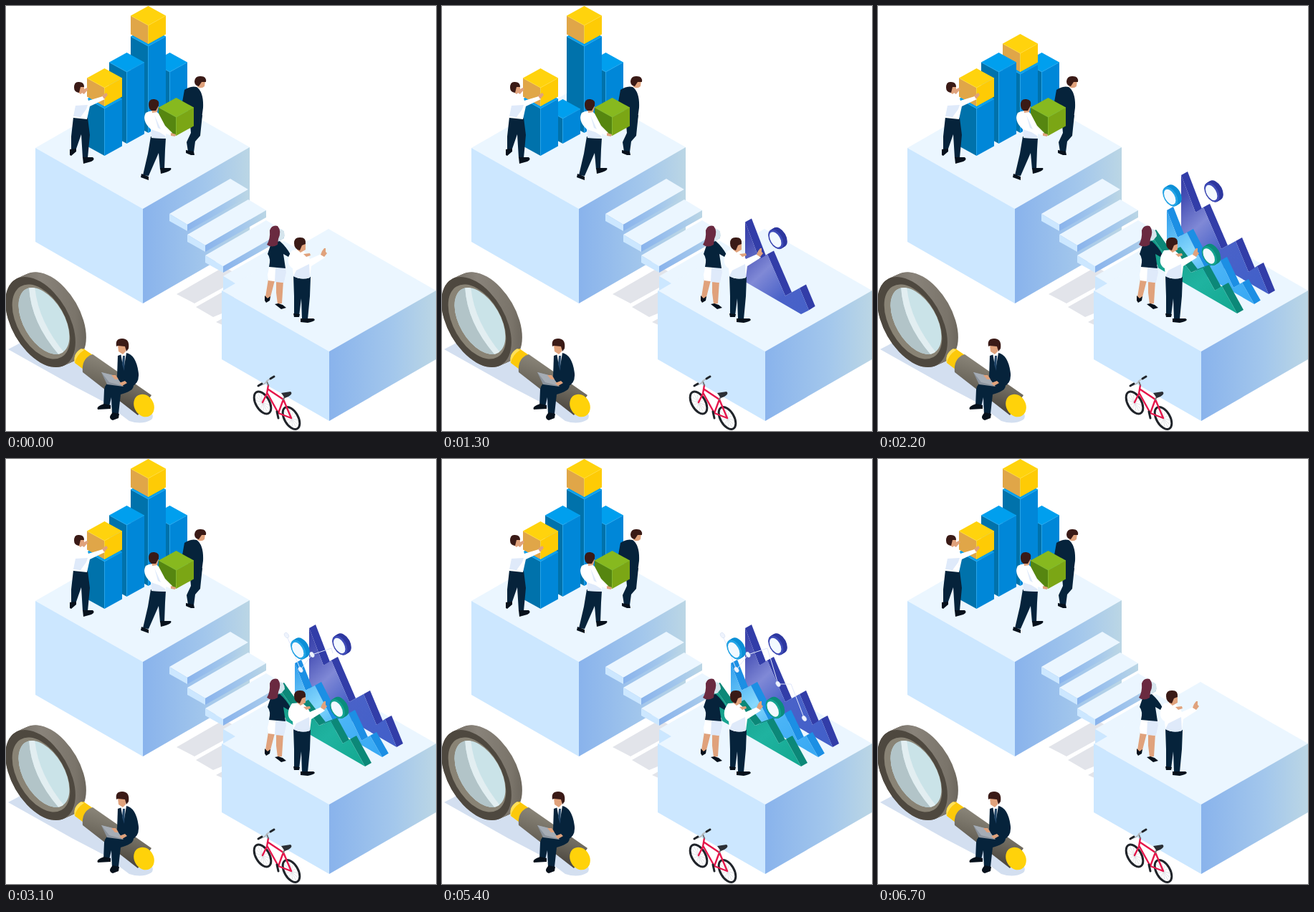
Animation, 600 px wide and 593 px high, one loop 6800 ms. Source, as an HTML page:

```html
<!DOCTYPE html>
<html lang="en">
<head>
<meta charset="utf-8">
<title>Isometric charts</title>
<style>
  html, body { margin: 0; width: 100%; height: 100%; overflow: hidden; background: #fff; }
  svg { display: block; width: 600px; height: 593px; }
  .skin { fill: #e0a27c; }
  .hair { fill: #3a1a16; }
  .navy { fill: #06233b; }
  .shoe { fill: #07111c; }
  .shirt { fill: #fff; }
  .fold { fill: #dfeafa; }
  .top { fill: #ebf6ff; }
  .left { fill: #cce7ff; }
  .right { fill: url(#side); }
  .shade { fill: #d3dff0; }
  .cast { fill: #e2e4ea; }
  .thin { fill: none; stroke-linecap: round; stroke-linejoin: round; }
</style>
</head>
<body>
<svg viewBox="0 0 600 593" xmlns="http://www.w3.org/2000/svg">
  <defs>
    <linearGradient id="side"><stop stop-color="#89b3ec"/><stop offset=".6" stop-color="#a3c7ec"/><stop offset="1" stop-color="#bbd6e5"/></linearGradient>
    <linearGradient id="indigo" x1="0" y1="0" x2=".7" y2="1"><stop stop-color="#343da6"/><stop offset=".14" stop-color="#464fb4"/><stop offset=".38" stop-color="#8089d6"/><stop offset=".62" stop-color="#4a62c8"/><stop offset="1" stop-color="#4360c9"/></linearGradient>
    <linearGradient id="sky" x1="0" y1="0" x2=".8" y2="1"><stop stop-color="#2f9dec"/><stop offset=".4" stop-color="#86d8fd"/><stop offset=".65" stop-color="#4ab4f6"/><stop offset="1" stop-color="#3aaaf4"/></linearGradient>
    <linearGradient id="teal" x1="0" y1="0" x2="1" y2="1"><stop stop-color="#119581"/><stop offset=".6" stop-color="#1fb3a0"/><stop offset="1" stop-color="#13a78f"/></linearGradient>
    <linearGradient id="rim" x1="0" y1="0" x2="1" y2="1"><stop stop-color="#69635a"/><stop offset=".4" stop-color="#89837a"/><stop offset=".75" stop-color="#7a746a"/><stop offset="1" stop-color="#58534a"/></linearGradient>
    <linearGradient id="grip" x1=".6" y1=".2" x2=".4" y2=".8"><stop stop-color="#878276"/><stop offset=".5" stop-color="#6f6a5f"/><stop offset="1" stop-color="#4f4a42"/></linearGradient>
    <clipPath id="floor"><path d="M370 0H600V371L554 398 511 425 501 430 370 354Z"/></clipPath>
    <clipPath id="lens"><ellipse cx="53" cy="439.500" rx="28.500" ry="51" transform="rotate(-30 53 439.500)"/></clipPath>
  </defs>

  <!-- upper block -->
  <path class="top" d="M41 198 191 112 340 197 191 283Z"/>
  <path class="left" d="M41 198 191 283V415L41 329Z"/>
  <path class="right" d="M191 283 340 197V329L191 415Z"/>

  <!-- stairs -->
  <path class="cast" d="M238 402 304 364 330 378 263 415ZM265 420 318 390V422L289 434ZM293 441 318 427V452Z"/>
  <g id="stairs"></g>

  <!-- lower block -->
  <path class="top" d="M301 397 450 311 600 397 451 482Z"/>
  <path class="left" d="M301 397 451 482V579L301 493Z"/>
  <path class="right" d="M451 482 600 397V493L451 579Z"/>
  <path class="top" d="M303 377 388 328 405 338 320 387Z"/>
  <path class="left" d="M303 377 320 387 303 397Z"/>

  <g id="bars"></g>

  <!-- man in a suit -->
  <path class="navy" d="M256 154 274 152 272 171 271 181 264 189 262 204 254 203 252 190 258 177Z"/>
  <path class="shoe" d="M251 201 262 203 263 208 258 208 251 205Z"/>
  <path class="navy" d="M249 117Q258 111 266 113 276 120 275 142L273 157 255 160 253 141 246 134Z"/>
  <path class="skin" d="M268 104 278 104 277 112Q273 116 267 113Z"/>
  <path class="hair" d="M263 105Q264 97 272 98 280 98 279 106L273 106 269 112Q263 111 263 105Z"/>
  <g id="crate"></g>

  <!-- man with a crate -->
  <path class="navy" d="M202 182 223 184 222 200 221 228 215 228 213 205 199 237 191 236 198 206Z"/>
  <path class="shoe" d="M189 234 199 238 199 243 188 239ZM215 226 230 226Q233 230 216 234Z"/>
  <path class="shirt" d="M195 149Q206 143 213 150L222 167 232 177 231 181 223 178 223 185 203 184 202 172Q189 160 195 149Z"/>
  <path class="fold" d="M202 172 214 176 222 181 223 185 203 184ZM207 152 216 172 212 170Z"/>
  <path class="skin" d="M230 177 237 179 236 182 230 181ZM203 141 213 140 211 148 204 149Z"/>
  <path class="hair" d="M199 138Q199 129 207 130 215 131 213 139L209 146 203 146Q199 143 199 138Z"/>

  <!-- man at the first bar -->
  <path class="navy" d="M94 155 114 156 117 180 114 212 107 212 105 179 97 202 91 201 91 182Z"/>
  <path class="shoe" d="M89 200 98 199 98 203 91 209 89 208ZM107 211 121 211Q125 214 119 217L108 220Z"/>
  <path class="skin" d="M103 119 113 114 115 116 108 124Z"/>
  <path class="shirt" d="M95 121 106 121Q114 126 115 132L135 126 138 130 117 140 113 158 94 156 94 143Q85 130 95 121Z"/>
  <path class="fold" d="M97 139 114 138 112 144 104 155 94 154Z"/>
  <path class="skin" d="M134 125 140 121 142 124 137 130ZM102 111 109 111 109 119 104 123 100 120Z"/>
  <path class="hair" d="M95 114Q95 105 102 106 109 106 109 113L104 113 102 121Q95 120 95 114Z"/>

  <g clip-path="url(#floor)" id="charts"></g>

  <!-- woman -->
  <path class="skin" d="M366 381 375 383 369 406 365 412 362 406ZM377 383 387 383 385 415 379 416 377 400Z"/>
  <path class="shoe" d="M361 404 365 408 369 405 368 411 363 414 361 411ZM375 416 380 415 386 417 391 421 384 423Z"/>
  <path class="shirt" d="M368 361 390 361 391 372 388 386 366 383 365 375Z"/>
  <path class="fold" d="M376 365 390 362 391 372 388 386 375 385Z"/>
  <path class="navy" d="M370 331 382 328Q392 337 397 347L394 350 387 346 390 366 367 364Q370 352 365 346Z"/>
  <path d="M378 313Q388 308 389 321L384 327 378 328Z" fill="#d5e5ed"/>
  <path d="M368 313Q371 305 379 307 385 314 380 325L379 333Q371 338 364 333 369 325 368 313Z" fill="#6a2a40"/>

  <!-- pointing man -->
  <path class="navy" d="M401 375 425 378 424 405 421 437 413 437 412 408 409 432 402 431 402 405Z"/>
  <path class="shoe" d="M401 429 410 430 409 434 402 434ZM411 436 429 436Q435 439 421 442L411 441Z"/>
  <path class="shirt" d="M399 341 412 340Q420 344 424 353L440 346 445 351 426 363 424 379Q412 383 401 377L400 366Q391 361 395 348Z"/>
  <path class="fold" d="M405 369 423 360 424 379Q412 383 401 377Z"/>
  <path class="skin" d="M439 347 441 342 444 338 446 338 446 343 448 345 444 350ZM415 346 424 345 425 348 419 350ZM406 332 418 332 418 340 411 344 406 340Z"/>
  <path class="hair" d="M402 331Q402 322 411 323 419 323 418 332L413 334 410 341Q402 339 402 331Z"/>

  <!-- magnifier -->
  <path class="shade" d="M3 479 24 468 74 498 110 494 160 548 196 560Q209 570 203 577 190 585 172 579L136 552 92 529Z"/>
  <g id="glass"></g>
  <path d="M96 498Q93 483 108 478L121 487 108 507Z" fill="#fcc90a"/>
  <path d="M96 498Q98 487 109 480L105 478Q93 485 96 498Z" fill="#ffe05a"/>
  <path d="M107 511Q105 491 121 486L203 543 184 571Z" fill="url(#grip)"/>
  <ellipse cx="192.500" cy="557.500" rx="13.500" ry="16.500" transform="rotate(-30 192.500 557.500)" fill="#ffd20a"/>

  <!-- seated man -->
  <path class="navy" d="M146 524 176 526Q184 535 160 542L157 569 148 571 147 546 144 559 136 559 137 535Q138 527 146 524Z"/>
  <path class="shoe" d="M137 555 146 557 146 562 128 563Q125 559 137 555ZM149 567 158 569 157 575 149 578Q141 575 149 567Z"/>
  <path class="navy" d="M156 488 168 484Q182 487 185 513 186 527 175 531L159 528 155 517Z"/>
  <path class="shirt" d="M160 484 168 484 165 502 162 496Z"/>
  <path d="M163 488 166 488 165 509 162 500Z" fill="#214568"/>
  <path d="M133 511 153 516 164 531 141 528Z" fill="#8b939d"/>
  <path d="M133 511 153 516 163 530 144 525Z" fill="#a5acb5"/>
  <path class="skin" d="M147 515 153 515 157 521 152 521ZM158 526 166 523 169 526 162 530ZM156 473 168 473 167 482 163 486 157 482Z"/>
  <path class="hair" d="M154 475Q152 464 162 464 173 464 171 478L168 482 166 475 156 474Z"/>

  <!-- bicycle -->
  <g class="thin">
    <g id="wheels"></g>
    <path d="M358 553 364 541 366 529M366 535 387 549 380 568 365 541M380 568 398 575 387 549" stroke="#e5164b" stroke-width="2.400"/>
    <path d="M387 549 390 543M366 529 364 524" stroke="#777" stroke-width="2"/>
    <path d="M355 529Q362 528 364 523L371 519" stroke="#b7bcc2" stroke-width="2"/>
    <path d="M352 530 357 527M369 520 374 517" stroke="#20242a" stroke-width="3"/>
    <path d="M378 566 380 575" stroke="#20242a" stroke-width="3"/>
  </g>
  <path d="M384 540 397 538Q401 541 394 545L389 547Z" fill="#2b2f35"/>
</svg>

<script>
const LOOP = 6800, FRAME = 100, RISE = 13.1, SINK = 15.25;
const $ = id => document.getElementById(id);

function add(parent, tag, attrs) {
  const el = document.createElementNS('http://www.w3.org/2000/svg', tag);
  for (const k in attrs) el.setAttribute(k, attrs[k]);
  return parent.appendChild(el);
}
const poly = (parent, points, fill) => add(parent, 'polygon', { points: points.join(' '), fill });
const disc = (parent, x, y, rx, ry, attrs) =>
  add(parent, 'ellipse', { cx: x, cy: y, rx, ry, transform: `rotate(-30 ${x} ${y})`, ...attrs });

// Isometric column: back corner at (x, y), front corner ends at base.
function prism(parent, x, [top, left, right], edge) {
  const g = add(parent, 'g', {});
  const faces = [left, right, top].map(c => poly(g, [], c));
  const line = add(g, 'path', { stroke: edge, 'stroke-width': .8, fill: 'none' });
  const w = 24.5, h = 13.5;
  return (y, base) => {
    const l = [x - w, y + h], r = [x + w, y + h], f = [x, y + 2 * h];
    const sets = [
      [l, f, [x, base], [x - w, base - h]],
      [f, r, [x + w, base - h], [x, base]],
      [[x, y], r, f, l]
    ];
    faces.forEach((p, i) => p.setAttribute('points', sets[i].join(' ')));
    line.setAttribute('d', `M${l} ${f} ${r}M${f}V${base}`);
  };
}

const blue = ['#009fee', '#0072ab', '#0087d8'];
const gold = ['#ffd30d', '#e0a648', '#fecb05'];
const bar = x => prism($('bars'), x, blue, '#22a6ee');
const cube = x => prism($('bars'), x, gold, '#ffda3a');
const rightBar = bar(228.5), tower = bar(198.5), cap = cube(198.5), middle = bar(168.5);
bar(137.5)(116, 209);
cube(137.5)(87, 140);
prism($('crate'), 237.5, ['#87b91f', '#568610', '#7ba615'], '#8fc02a')(128, 181);

for (let i = 0; i < 3; i++) {
  const g = add($('stairs'), 'g', { transform: `translate(${25 * i} ${29 * i})` });
  add(g, 'path', { class: 'top', d: 'M228 290 313 241 338 256 253 305Z' });
  add(g, 'path', { class: 'left', d: 'M228 290 253 305V314L228 300Z' });
  add(g, 'path', { class: 'right', d: 'M253 305 338 256V266L253 314Z' });
}

function magnifier(g) {
  for (let i = 0; i <= 15; i++) disc(g, 48 + i, 441 - i * .45, 40, 69, { fill: 'url(#rim)' });
  disc(g, 48, 441, 40, 69, { fill: '#4e483f' });
  disc(g, 49, 440.5, 33, 57, { fill: '#898375' });
  disc(g, 53, 439.5, 28.5, 51, { fill: '#cae3e8' });
  const shine = add(g, 'g', { 'clip-path': 'url(#lens)' });
  add(shine, 'path', { d: 'M15 390 32 390Q34 442 76 489L15 489Z', fill: '#b2c4c8' });
  add(shine, 'path', { d: 'M32 390 40 390Q44 440 84 487L76 489Q34 442 32 390Z', fill: '#e2eef1' });
}
magnifier($('glass'));

for (const [x, y] of [[358, 553.5], [398, 575]]) {
  for (let a = 0; a < 180; a += 30) {
    const c = Math.cos(a * Math.PI / 180) * 9, s = Math.sin(a * Math.PI / 180) * 16;
    add($('wheels'), 'path', {
      d: `M${x - c} ${y - s}L${x + c} ${y + s}`, stroke: '#c9cdd2', 'stroke-width': .5,
      transform: `rotate(-27 ${x} ${y})`
    });
  }
  disc($('wheels'), x, y, 9.5, 17, { stroke: '#20242a', 'stroke-width': 3 });
}

// Jagged slab: front profile pushed back by (9,-5), standing on an isometric base line.
function slab(g, pts, face, edge) {
  const back = ([x, y]) => [x + 9, y - 5];
  for (let i = 1; i < pts.length; i++)
    poly(g, [pts[i - 1], back(pts[i - 1]), back(pts[i]), pts[i]], edge);
  const [x0] = pts[0], [x1, y1] = pts[pts.length - 1];
  poly(g, [...pts, [x0, y1 - .577 * (x1 - x0)]], face);
}
function ring(g, x, y, color, inner) {
  for (let i = 0; i <= 5; i++) disc(g, x + i, y - i * .6, 9, 15, { fill: color });
  disc(g, x, y, 8.6, 14.5, { fill: inner });
  disc(g, x - .8, y + .4, 6.6, 11.8, { fill: '#f2f9ff' });
}

const layer = () => add($('charts'), 'g', {});
const indigo = layer(), sky = layer(), trend = layer(), skyRing = layer(), teal = layer();

slab(indigo, [[423, 236], [443, 288], [454, 281], [479, 339], [499, 328], [517, 371], [529, 363], [545, 402]],
  'url(#indigo)', '#323da8');
ring(indigo, 466, 260, '#2d379f', '#3f4cb8');
slab(sky, [[403, 285], [418, 323], [431, 316], [457, 367], [478, 355], [496, 393], [508, 386], [525, 416]],
  'url(#sky)', '#1c8fe4');
ring(skyRing, 408, 266, '#0b8fd6', '#22a4e6');
slab(teal, [[379, 317], [403, 351], [413, 341], [437, 372], [453, 366], [470, 397], [480, 391], [501, 429]],
  'url(#teal)', '#0c8878');
ring(teal, 462.5, 348.5, '#0b8c7c', '#14a390');

const knots = [[391.5, 246], [411, 294], [427, 273], [454, 264], [469, 314], [487, 314], [505.5, 362]];
const thread = add(trend, 'polyline', {
  points: knots.join(' '), fill: 'none', stroke: '#dfe6fb', 'stroke-width': 1,
  pathLength: 1, 'stroke-dasharray': '1 2'
});
const dots = knots.filter((_, i) => i !== 3 && i !== 5).map(([x, y]) => ({
  x, el: disc(trend, x, y, 2.7, 4, { fill: '#eef3fd', stroke: '#d4def2', 'stroke-width': .6 })
}));

const clamp = (v, max) => Math.max(0, Math.min(max, v));
// Number of frames elapsed since a move began, the first one counted at its start.
const steps = (t, start, max) => clamp((t - start) / FRAME + 1, max);
const dip = (t, down, up, n) => 13 * (steps(t, down, n) - steps(t, up, n));

function draw(now) {
  const t = Math.floor(now % LOOP / FRAME) * FRAME;

  middle(65 + dip(t, 200, 1600, 5), 192);
  const drop = dip(t, 1400, 2300, 3);
  tower(29 + drop, 177);
  cap(drop, 53 + drop);
  rightBar(65 + dip(t, 4300, 5200, 3), 178);

  const sink = SINK * steps(t, 5700, 11);
  const place = (g, end) =>
    g.setAttribute('transform', `translate(0 ${Math.max(0, end - t) / FRAME * RISE + sink})`);
  place(indigo, 1800);
  place(sky, 2000);
  place(skyRing, 2000);
  place(teal, 2200);
  place(trend, 0);
  $('charts').setAttribute('visibility', t < 500 || t >= 6700 ? 'hidden' : 'visible');

  const p = steps(t, 2900, 6) / 6;
  trend.setAttribute('display', p ? 'inline' : 'none');
  thread.setAttribute('stroke-dashoffset', 1 - p);
  const reach = thread.getPointAtLength(thread.getTotalLength() * p).x;
  for (const d of dots) d.el.setAttribute('visibility', d.x <= reach + .5 ? 'inherit' : 'hidden');
}

const begin = performance.now();
function tick() {
  draw(performance.now() - begin);
  requestAnimationFrame(tick);
}
tick();
</script>
</body>
</html>
```
